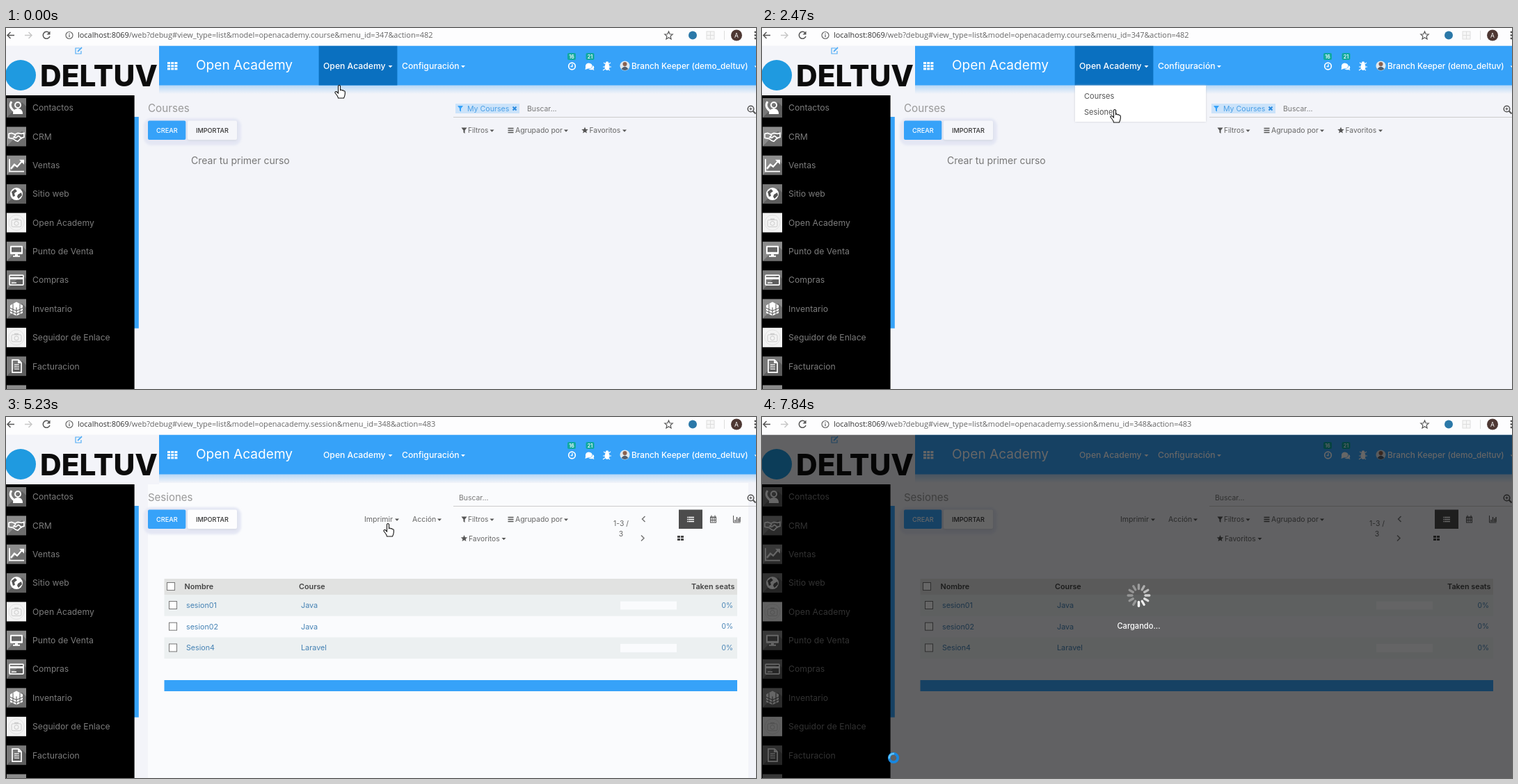
Write an HTML page that moves like this. It is 1078x520 px and loops after 8000 ms.

```html
<!DOCTYPE html>
<html lang="es">
<head>
<meta charset="utf-8">
<title>Open Academy</title>
<style>
html, body { margin: 0; width: 100%; height: 100%; overflow: hidden; background: #f3f4f9; }
svg { display: block; width: 1078px; height: 520px; font-family: Inter, "Open Sans", sans-serif; }
.url { font-family: "Open Sans", "Noto Sans", sans-serif; }
</style>
</head>
<body>
<svg id="stage" viewBox="0 0 1078 520" xmlns="http://www.w3.org/2000/svg"></svg>
<script>
const BLUE = '#36a2f9', PAPER = '#f3f4f9', SHEET = '#fafbfd';
const LOOP = 8000;

const rect = (x, y, w, h, fill, more = '') =>
  `<rect x="${x}" y="${y}" width="${w}" height="${h}" fill="${fill}" ${more}/>`;
const circle = (x, y, r, fill, more = '') =>
  `<circle cx="${x}" cy="${y}" r="${r}" fill="${fill}" ${more}/>`;
const fill = (d, color) => `<path d="${d}" fill="${color}"/>`;
const line = (d, color, w = 1.5) =>
  `<path d="${d}" fill="none" stroke="${color}" stroke-width="${w}"/>`;
// y is the middle of the capital letters
const text = (x, y, s, size, color, more = '') =>
  `<text x="${x}" y="${y + size * 0.36}" font-size="${size}" fill="${color}" ${more}>${s}</text>`;
const at = (x, y, body) => `<g transform="translate(${x} ${y})">${body}</g>`;
const group = (id, body) => `<g id="${id}">${body}</g>`;
const caret = (x, y, color) => fill(`M${x - 3} ${y - 1.5}h6l-3 3.2z`, color);
const funnel = (x, y, color) => fill(`M${x - 4} ${y - 4}h8l-3 4v4.5l-2-1.5v-3z`, color);
const bars = (x, y, color) => line(`M${x - 4} ${y - 3}h8m-8 3h8m-8 3h8`, color, 1.6);
const star = (x, y, r, paint) => {
  let d = '';
  for (let i = 0; i < 10; i++) {
    const a = i * Math.PI / 5, k = i % 2 ? r * 0.45 : r;
    d += `${i ? 'L' : 'M'}${(x + k * Math.sin(a)).toFixed(1)} ${(y - k * Math.cos(a)).toFixed(1)}`;
  }
  return `<path d="${d}Z" ${paint}/>`;
};
const tiles = (x, y, cols, rows, w, h, gap, color) => {
  let s = '';
  for (let i = 0; i < cols * rows; i++)
    s += rect(x + (i % cols) * (w + gap), y + Math.floor(i / cols) * (h + gap), w, h, color);
  return s;
};

function browserBar() {
  const url = (page, menu, action) => text(103, 10.5,
    `localhost:8069<tspan fill="#666">/web?debug#view_type=list&amp;model=openacademy.${page}&amp;menu_id=${menu}&amp;action=${action}</tspan>`,
    10.95, '#333', 'class="url"');
  return rect(0, 0, 1078, 25.5, '#fdfdfe')
    + line('M12 10.5H2m4.5-4.5L2 10.5 6.5 15', '#555')
    + line('M27 10.5h10m-4.5-4.5L37 10.5 32.5 15', '#c8c8c8')
    + line('M62 7a5 5 0 1 0 1 5', '#555') + fill('M63.5 4.5v5h-5z', '#555')
    + circle(91, 10.5, 5, 'none', 'stroke="#666" stroke-width="1.2"')
    + line('M91 9.7v3.6m0-5.6v1.2', '#666', 1.3)
    + group('urlCourse', url('course', 347, 482)) + group('urlSession', url('session', 348, 483))
    + star(952.5, 11, 6, 'fill="none" stroke="#555" stroke-width="1.2"')
    + circle(987, 10.5, 6, '#2b78a8')
    + rect(1007, 5, 11, 11, '#f6f6f6', 'stroke="#ddd"') + line('M1007 10.5h11m-5.5-5.5v11', '#ddd', 1)
    + line('M1032.5 4v13', '#ddd', 1)
    + circle(1050, 10.5, 8, '#4e3833') + text(1050, 10.5, 'A', 8.5, '#fff', 'text-anchor="middle"')
    + circle(1077, 6, 1.4, '#555') + circle(1077, 10.5, 1.4, '#555') + circle(1077, 15, 1.4, '#555');
}

function header() {
  const badge = (x, n) => rect(x - 6, 36, 12, 10, '#10a99f', 'rx="2"')
    + text(x, 41, n, 7, '#fff', 'text-anchor="middle" font-weight="600"');
  const bug = line('M859 50l3 2m7-2l-3 2m-8 4h3m6 0h3m-12 5l3-2m7 2l-3-2', '#fff', 1.2)
    + '<ellipse cx="864" cy="56" rx="3.5" ry="5" fill="#fff"/>' + circle(864, 50.5, 2.3, '#fff');
  return rect(220, 82, 858, 13, 'url(#fade)') + rect(220, 25.5, 858, 57, BLUE)
    + group('activeMenu', rect(449.6, 25.5, 112.8, 57, '#0a70c0'))
    + tiles(232, 49, 3, 3, 4, 3, 1.2, '#fff')
    + text(273, 53, 'Open Academy', 19.1, '#fff')
    + text(456, 54.5, 'Open Academy', 12.2, '#fff', 'font-weight="500"') + caret(552.5, 55.5, '#fff')
    + text(569, 54.5, 'Configuración', 12.2, '#fff', 'font-weight="500"') + caret(657, 55.5, '#fff')
    + badge(813, '16') + badge(839.5, '21')
    + circle(813.5, 55, 4.8, 'none', 'stroke="#fff" stroke-width="1.7"')
    + line('M814 52v3.5h-2.5', '#fff', 1.3)
    + fill('M833 57q-1-6 4.5-6.5q5.5 .5 5 4.5q-1 4-6 3.5l-4 1.5z', '#fff')
    + fill('M843.5 54q3 2 1 5l1 2-3-1q-3 .7-5-1q5 0 6-5z', '#fff') + bug
    + circle(889.5, 54.5, 7, '#dfe8ee') + circle(889.5, 52, 3, '#8a6250') + fill('M884.5 59q5-7 10 0q-5 4-10 0z', '#4e5f70')
    + text(899, 54.5, 'Branch Keeper (demo_deltuv)', 11.8, '#fff', 'font-weight="500"')
    + fill('M1075.5 54.5h3v3z', '#fff');
}

function logo() {
  return rect(0, 25.5, 220, 71.5, PAPER)
    + circle(21, 68, 22, '#1f9ae0')
    + text(49, 68.5, 'DELTUV', 42.4, '#0c0c0c', 'font-weight="800"')
    + line('M106 29h-6v8h8v-4', '#55aef5', 1.2) + line('M103 34l6-6', '#55aef5', 1.8);
}

function sidebar() {
  const W = '#fff';
  const camera = rect(-7, -4, 14, 10, 'none', 'rx="2" stroke="#ccc"') + rect(-3, -6, 6, 2, '#ccc')
    + circle(0, 1, 3, 'none', 'stroke="#ccc"') + circle(0, 0, 11, 'none', 'stroke="#e2e2e2"');
  const items = [
    ['Contactos', circle(2, -4, 4, 'none', `stroke="${W}" stroke-width="2"`) + fill('M-5 9q0-8 7-8t7 8z', W)
      + line('M-7-9q-5 7 4 14', W, 3)],
    ['CRM', line('M-11-4l4-1 5 2 4-2 5 1 4-1v6l-4 1-5 5-3-1-4-3-6-1zM-1-2l-3 3 3 1 4-3 5 4', W, 1.7)],
    ['Ventas', line('M-10-9V9H11', W, 1.8) + line('M-8 5l5-6 4 3 8-9', W, 2.3) + fill('M4-8h7v7z', W)],
    ['Sitio web', circle(0, 0, 9, W) + fill('M-7-3l5-4 3 3-4 3 1 4-3 1zM2 1l5-3 1 4-5 5-2-3z', '#555')],
    ['Open Academy', camera],
    ['Punto de Venta', rect(-9, -8, 18, 12, W, 'rx="1"') + rect(-7, -6, 14, 7, '#666') + fill('M-2 4h4v2h3v2h-10v-2h3z', W)],
    ['Compras', rect(-10, -7, 20, 14, 'none', `stroke="${W}" stroke-width="1.7" rx="1"`)
      + rect(-10, -4, 20, 3, W) + line('M-7 4h7', W)],
    ['Inventario', fill('M0-10l9 5V6L0 10-9 6V-5z', W) + line('M-9-1L0 3l9-4M-9 3l9 4 9-4M0-2V10M-5-7V8M5-7V8', '#555', 1)],
    ['Seguidor de Enlace', camera],
    ['Facturacion', line('M-6-9H3l4 4V9H-6zM3-9v4h4', W, 1.7) + line('M-3-2h7m-7 3h7m-7 3h7', W, 1.3)],
    ['', line('M-9 7V0m5 7V-5m5 12V-1m5 8V-8', W, 2.5)]
  ];
  return rect(184, 128, 6.8, 304.6, BLUE) + rect(0, 97, 184.6, 423, '#000')
    + items.map(([name, glyph], i) => {
      const y = 115 + i * 41.35, pale = glyph === camera;
      const shade = pale ? '' : fill('M-14 14L8-8 14-2V14z', 'rgba(0,0,0,.22)');
      return at(15, y, rect(-14, -14, 28, 28, pale ? '#f3f3f3' : i % 3 ? '#8c8c8c' : '#787878') + shade + glyph)
        + text(38, y, name, 12.2, '#7c7c7c');
    }).join('');
}

function buttons(paper) {
  return rect(198, 130, 140, 39, '#e4e7f4', 'rx="11" filter="url(#soft)"')
    + rect(261, 135, 71, 27.5, '#d6d9e3', 'rx="2" filter="url(#soft)"')
    + rect(204, 133.5, 54.3, 27.5, BLUE, 'rx="2"') + rect(261, 133.5, 71, 27.5, paper, 'rx="2"')
    + text(216, 147.5, 'CREAR', 9.2, '#fff', 'font-weight="500"')
    + text(273, 147.5, 'IMPORTAR', 9.1, '#333', 'font-weight="500"');
}

const lens = line('M1073.5 119.5l4 4', '#555', 2) + circle(1070.5, 116.5, 4.3, 'none', 'stroke="#555" stroke-width="1.5"')
  + line('M1068.5 116.5h4m-2-2v4', '#555', 1);
const filters = (fx, fy) => funnel(658.5, 147.5, '#555') + text(664, 147.5, 'Filtros', 10.1, '#666')
  + caret(698.5, 148, '#555') + bars(725.5, 147.5, '#555') + text(732, 147.5, 'Agrupado por', 10.4, '#666')
  + caret(805, 148, '#555') + star(fx, fy, 5, 'fill="#555"')
  + text(fx + 6.5, fy, 'Favoritos', 10.3, '#666') + caret(fx + 57, fy + .5, '#555');

function coursePage() {
  return text(204, 116, 'Courses', 15.2, '#999') + buttons('#f5f6fa')
    + rect(646, 109, 92, 14, '#cbe3fa') + funnel(653, 116, BLUE)
    + text(663, 116, 'My Courses', 10.6, '#4a9fe6')
    + line('M728.5 113.5l5 5m0-5l-5 5', '#2b8be0', 2)
    + text(749, 116, 'Buscar...', 10.4, '#777') + line('M643 128.5h435', '#ccc', 1) + lens
    + filters(832, 147.5)
    + text(266, 190.5, 'Crear tu primer curso', 14, '#777');
}

function sessionPage() {
  const rows = [['sesion01', 'Java'], ['sesion02', 'Java'], ['Sesion4', 'Laravel']];
  const box = (x, y) => rect(x + .5, y - 5.5, 11, 11, '#fff', 'stroke="#777"');
  const head = (x, s, more = '') => text(x, 244, s, 10.8, '#444', 'font-weight="600" ' + more);
  const table = rect(227.5, 233, 823.5, 23, '#e1e2e1') + box(231, 244)
    + head(256.5, 'Nombre') + head(421, 'Course') + head(1047.5, 'Taken seats', 'text-anchor="end"')
    + rows.map(([name, course], i) => {
      const y = 271 + i * 30.7, odd = i % 2 === 0;
      return (odd ? rect(227.5, y - 15, 823.5, 30.7, '#ecf0f1') + rect(883, y - 5.5, 81, 12, SHEET) : '')
        + box(234, y) + text(259, y, name, 10.7, '#4582b4') + text(424, y, course, 10.8, '#4582b4')
        + text(1045, y, '0%', 10.2, '#4582b4', 'text-anchor="end"');
    }).join('') + rect(227.5, 379, 823.5, 16, BLUE);
  return group('sheet', rect(204, 94, 863, 426, SHEET))
    + text(204, 116, 'Sesiones', 15, '#999') + buttons('#fdfdfe')
    + text(651, 116, 'Buscar...', 10.4, '#777') + line('M643 128.5h435', '#ccc', 1) + lens
    + group('focus', rect(643, 124.5, 418, 2, '#2e8be0') + line('M652.5 108v15', '#333', 1))
    + filters(658.5, 175)
    + text(884, 153.5, '1-3 /', 10.4, '#666', 'text-anchor="middle"') + text(884, 168, '3', 10.4, '#666', 'text-anchor="middle"')
    + line('M918.5 143l-4 4 4 4M913 170.5l4 4-4 4', '#777')
    + rect(967, 133.5, 34, 27.5, '#4c4c4c') + bars(985, 147.5, '#fff') + line('M979 144.5h1.5m-1.5 3h1.5m-1.5 3h1.5', '#fff')
    + rect(1012.5, 144, 8, 8, 'none', 'stroke="#555"') + line('M1012 145h9m-9 3.5h9m-6-4v7m3-7v7m-4-10v3m5-3v3', '#555', 1)
    + line('M1045.5 142v10h10', '#555', 1) + line('M1048 151v-3m2.5 3v-7m2.5 7v-5m2 5v-7', '#555', 1.4)
    + tiles(965, 171, 2, 2, 4, 3, 1, '#444')
    + group('actions', text(515, 147.5, 'Imprimir', 10.6, '#666') + caret(562, 148, '#555')
      + text(584, 147.5, 'Acción', 10.5, '#666') + caret(623, 148, '#555'))
    + table;
}

const panel = (x, y, w, h) => rect(x, y, w, h, '#c9ccd4', 'filter="url(#soft)"') + rect(x, y, w, h, '#fff');

function spinner() {
  let s = '';
  for (let i = 0; i < 12; i++)
    s += `<line class="spoke" y1="-9.5" y2="-15.3" stroke="#fff" stroke-width="3.4" stroke-linecap="round" transform="rotate(${i * 30})"/>`;
  return at(541.5, 257, s);
}

const pointers = {
  hand: '<path d="M-1.5 1.5Q0-.5 1.5 1.5V7.5Q3 6.3 4.2 8Q5.6 7 6.6 8.8Q8.3 8.3 8.3 10V13Q8 16 6.5 19H-1.5Q-2 16-6 11.5Q-6.5 9-4 9.6L-1.5 12Z" fill="#fff" stroke="#111" stroke-width="1.1"/>',
  arrow: '<path d="M.5 0V13.5L3.5 10.7 5.5 15.5 7.5 14.6 5.6 10H9.5Z" fill="#fff" stroke="#111"/>',
  busy: circle(0, 0, 6.2, 'none', 'stroke="#1787e0" stroke-width="3.8"') + line('M-6 1A6 6 0 0 1 1-6', '#5cc3fb', 2.5)
};

const stage = document.getElementById('stage');
stage.innerHTML = `<defs>
  <linearGradient id="fade" x2="0" y2="1"><stop stop-color="#b4d6f6"/><stop offset="1" stop-color="${PAPER}"/></linearGradient>
  <filter id="soft" x="-20%" y="-30%" width="140%" height="160%"><feGaussianBlur stdDeviation="1.5"/></filter></defs>`
  + rect(0, 0, 1078, 520, PAPER)
  + group('course', coursePage()) + group('session', sessionPage())
  + header() + logo() + sidebar()
  + group('menu', panel(450, 83, 188, 52) + text(463, 98, 'Courses', 11, '#555') + text(463, 121, 'Sesiones', 11, '#555'))
  + group('print', panel(504, 161, 185, 38) + text(517, 180, 'Session Report', 10.8, '#555'))
  + group('veil', rect(0, 25.5, 1078, 494.5, '#000', 'opacity=".6"') + spinner())
  + group('loading', text(541.5, 301, 'Cargando...', 11.1, '#fff', 'text-anchor="middle" font-weight="500"'))
  + browserBar()
  + group('pointer', Object.keys(pointers).map(k => group(k, pointers[k])).join(''));

// start time, x, y of the pointer's hot spot; it jumps from stop to stop
const stops = [
  [0, 479, 82], [150, 494, 62], [430, 496, 66], [570, 500, 84], [710, 503, 104], [840, 505, 118],
  [980, 505, 128], [1110, 506, 122], [1250, 507, 105], [1650, 510, 84], [1770, 512, 68],
  [2050, 512, 74], [2190, 510, 92], [2330, 508, 106], [2470, 507, 117],
  [2880, 480, 138], [3010, 390, 182], [3140, 249, 242], [3260, 244, 247]
];
const glide = (start, step, n, from, to) => {
  for (let i = 0; i < n; i++) {
    const k = n > 1 ? i / (n - 1) : 1;
    stops.push([start + step * i, from[0] + (to[0] - from[0]) * k, from[1] + (to[1] - from[1]) * k]);
  }
};
glide(3540, 137, 7, [243, 250], [238, 298]);
glide(4500, 0, 1, [238, 290], [238, 290]);
glide(4620, 152.5, 5, [252, 286], [549, 153]);
glide(5370, 125, 3, [550, 156], [552, 181]);
glide(6050, 120, 3, [551, 182], [548.5, 185.5]);
glide(6600, 141.4, 8, [543, 177], [190, 498]);
glide(7710, 130, 2, [189, 496], [189, 491]);

const el = id => document.getElementById(id);
const show = (id, on) => { el(id).style.display = on ? '' : 'none'; };
const within = (t, a, b) => t >= a && t < b;
const spokes = [...document.querySelectorAll('.spoke')];

function draw(t) {
  let now = stops[0];
  for (const s of stops) if (s[0] <= t) now = s;
  const listed = t >= 2880, veiled = t >= 6600;
  const onMenu = t < 1250 || within(t, 1650, 2880);
  show('course', !listed);
  show('urlCourse', !listed);
  show('session', listed);
  show('urlSession', listed);
  show('sheet', !veiled);
  show('activeMenu', onMenu);
  show('menu', within(t, 430, 1250) || within(t, 2050, 2880));
  show('focus', t < 4088);
  show('actions', t >= 4088);
  show('print', within(t, 5370, 6170));
  show('veil', veiled);
  show('loading', t >= 7590);

  const kind = veiled ? 'busy' : onMenu || within(t, 5230, 6170) ? 'hand' : 'arrow';
  for (const k in pointers) show(k, k === kind);
  el('pointer').setAttribute('transform', `translate(${now[1]} ${now[2]})`);

  const head = 1 + Math.round((now[0] - 6600) / 73);
  spokes.forEach((s, i) => {
    const age = (((head - i) % 12) + 12) % 12;
    s.setAttribute('opacity', Math.max(0.35, 1 - age / 10));
  });
}

const origin = performance.now();
function tick() {
  draw((performance.now() - origin) % LOOP);
  requestAnimationFrame(tick);
}
tick();
</script>
</body>
</html>
```
